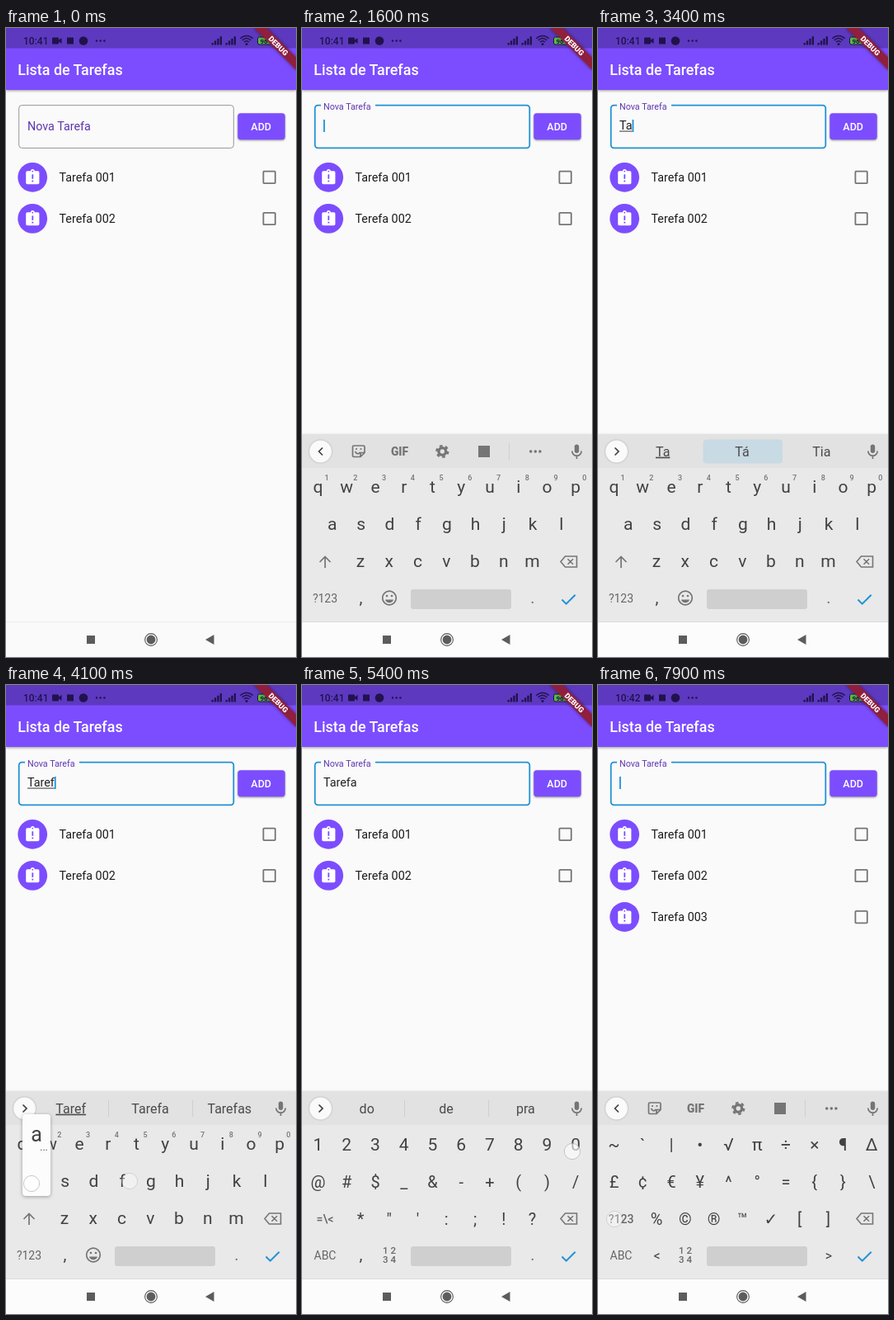
An HTML page that plays this animation: 352 px wide and 762 px high, repeating every 8 s.

```html
<!DOCTYPE html>
<html lang="pt">
<head>
<meta charset="utf-8">
<title>Lista de Tarefas</title>
<style>
html, body { margin: 0; height: 100%; overflow: hidden; background: #fafafa }
svg { display: block; width: 100%; height: 100%; font-family: Roboto, sans-serif }
text { white-space: pre }
</style>
</head>
<body>
<svg id="stage" viewBox="0 0 352 762"></svg>
<script>
const LOOP = 8000, STEP = 100, BODY = 14.34;
const VIOLET = '#7c4dff', BLUE = '#2092d4', GREY = '#757575', INK = '#424242', DARK = '#21124d';

// Timelines: [start, value]
const typed = [[0, ''], [1300, ''], [2900, 'T'], [3300, 'Ta'], [3700, 'Tar'], [3900, 'Tare'],
  [4100, 'Taref'], [4200, 'Tarefa'], [4400, 'Tarefa '], [4460, 'Tarefa '], [5500, 'Tarefa 0'],
  [5700, 'Tarefa 00'], [5900, 'Tarefa 003'], [6900, '']];
const hints = [[0, null], [2900, ['T', 'Te', 'Tá']], [3300, ['Ta', 'Tá', 'Tia']],
  [3700, ['Tar', 'Tarde', 'Tarefa']], [3900, ['Tare', 'Tarefa', 'Tarefas']],
  [4100, ['Taref', 'Tarefa', 'Tarefas']], [4200, ['Tarefa', 'Tarefas', 'Tarifa']],
  [4400, ['do', 'de', 'pra']], [5500, ['0', '00', '000']], [5700, ['00', '000', '0']],
  [5900, ['003', '03', '0003']], [7000, null]];
const layouts = [[0, 'low'], [2500, 'up'], [2900, 'low'], [5100, 'sym'], [7800, 'alt']];
const keys = {
  low: ['qwertyuiop', 'asdfghjkl', 'zxcvbnm'],
  up: ['QWERTYUIOP', 'ASDFGHJKL', 'ZXCVBNM'],
  sym: ['1234567890', '@#$_&-+()/', '*"\':;!?'],
  alt: ['~`|•√π÷×¶∆', '£¢€¥^°={}\\', '%©®™✓[]']
};
// [x, y, start, popup letter]
const taps = [[150, 119, 1100], [158, 560, 2800, 'T'], [34, 604, 3200, 'a'], [123, 560, 3600, 'r'],
  [88, 560, 3800, 'e'], [150, 601, 4000, 'f'], [31, 604, 4100, 'a'], [196.5, 697.5, 4400],
  [24, 714, 4900], [328, 565, 5400], [328, 563, 5600], [88, 557, 5800], [303, 119, 6600], [20, 647, 7800]];

const pen = document.createElement('canvas').getContext('2d');
const clamp = x => Math.min(1, Math.max(0, x));
const last = (list, t) => list.filter(e => e[0] <= t).pop();
const esc = s => s.replace(/&/g, '&amp;').replace(/</g, '&lt;');
const rect = (x, y, w, h, fill, r = 0, more = '') =>
  `<rect x="${x}" y="${y}" width="${w}" height="${h}" rx="${r}" fill="${fill}" ${more}/>`;
const circle = (x, y, r, fill, more = '') => `<circle cx="${x}" cy="${y}" r="${r}" fill="${fill}" ${more}/>`;
const fillPath = (d, fill, more = '') => `<path d="${d}" fill="${fill}" ${more}/>`;
const line = (d, color, w, more = '') =>
  `<path d="${d}" fill="none" stroke="${color}" stroke-width="${w}" ${more}/>`;
const text = (s, x, y, size, fill, more = '') =>
  `<text x="${x}" y="${y}" font-size="${size}" fill="${fill}" ${more}>${esc(s)}</text>`;
const mid = (s, x, y, size, fill, more = '') => text(s, x, y, size, fill, 'text-anchor="middle" ' + more);
const repeat = (n, f) => Array.from({ length: n }, (_, i) => f(i)).join('');
const shadow = (y, blur, color) => `style="filter:drop-shadow(0 ${y}px ${blur}px ${color})"`;

function header(t) {
  const bars = x => repeat(4, i => rect(x + i * 3.4, 18 - i * 2.6, 2.3, 2.5 + i * 2.6, DARK));
  const wifi = repeat(3, i => {
    const r = 4 + i * 3;
    return line(`M${292 - r * .75} ${20 - r * .72}a${r} ${r} 0 0 1 ${r * 1.5} 0`, DARK, 1.5);
  });
  return rect(0, 0, 352, 75, VIOLET, 0, shadow(1.2, 1.8, '#0006')) + rect(0, 0, 352, 24.5, '#5d39bf') +
    text(t < 5800 ? '10:41' : '10:42', 21, 20, 12, DARK, 'font-weight="500"') +
    rect(56, 11.5, 8, 8, DARK, 1) + fillPath('M64 14.5l3.5-2.5v7l-3.5-2.5z', DARK) +
    rect(74, 11.5, 8, 8, DARK) + circle(94, 15.5, 5.3, DARK) +
    repeat(3, i => circle(110 + i * 4.7, 15.5, 1.2, DARK)) +
    bars(249.5) + bars(266.5) + wifi + circle(292, 19.5, 1.5, DARK) +
    rect(305.5, 11, 17, 9, '#59b83d', 2, `stroke="${DARK}"`) + rect(323, 13.5, 2, 4, DARK) +
    mid('96', 313, 18.8, 8, DARK, 'font-weight="700"') +
    text('Lista de Tarefas', 14.3, 56.5, 17.9, '#fff', 'font-weight="500"') +
    `<g transform="translate(330.5 21.5) rotate(45)">` +
    rect(-36, -5.4, 72, 10.8, '#8f1f3c', 0, shadow(0, 2, '#0007')) +
    mid('DEBUG', 0, 3.2, 9.1, '#fff', 'font-weight="900"') + '</g>';
}

function field(t) {
  const focus = t >= 1300, p = 1 - (1 - clamp((t - 1350) / 200)) ** 3;
  const [since, value] = last(typed, t);
  pen.font = BODY + 'px Roboto, sans-serif';
  const w = pen.measureText(value).width;
  const blink = focus && Math.floor((t - since) / 500) % 2 == 0;
  return rect(15.7, 93.6, 260.6, 51.8, 'none', 3.6,
      focus ? `stroke="${BLUE}" stroke-width="1.8"` : 'stroke="#989898" stroke-width="1"') +
    (p ? rect(23, 91.5, 66 * p, 4, '#fafafa') : '') +
    text('Nova Tarefa', 26, 124 - 25.2 * p, BODY * (1 - .25 * p), '#5e35b1') +
    text(value, 26, 123, BODY, '#212121') +
    (t >= 2900 && t < 4400 ? rect(26, 124.6, w, .9, '#212121') : '') +
    (blink ? rect(26 + w, 111, 1.8, 15, BLUE) : '') +
    rect(281.3, 103.2, 57.4, 32, VIOLET, 3.6, shadow(1.2, 1.3, '#0006')) +
    mid('ADD', 309.7, 123.7, 12.5, '#fff', 'font-weight="500"');
}

function task(name, y) {
  return circle(32.2, y, 17.9, VIOLET) +
    rect(24.2, y - 7.6, 16.2, 16, '#fff', 1.8) + circle(32.3, y - 7.4, 2.5, '#fff') +
    circle(32.3, y - 7.2, .9, VIOLET) + rect(31.4, y - 3.5, 1.8, 5.5, VIOLET) + rect(31.4, y + 3.8, 1.8, 1.8, VIOLET) +
    text(name, 64.5, y + 5, BODY, '#1c1c1c') +
    rect(312.4, y - 7.1, 14.4, 14.4, 'none', .8, `stroke="${GREY}" stroke-width="1.8"`);
}

function toolbar() {
  return line('M25 508.5l-4.5 4.5 4.5 4.5', INK, 1.7) +
    line('M63 506h11.5a1.5 1.5 0 0 1 1.5 1.5v7l-5 5h-8a1.5 1.5 0 0 1-1.5-1.5v-10.5a1.5 1.5 0 0 1 1.5-1.5zM76 514.5h-5v5M64.5 513q3 5 6 1', GREY, 1.7) +
    circle(66, 510, 1.1, GREY) + circle(71.5, 510, 1.1, GREY) +
    mid('GIF', 118.5, 517.5, 13.8, GREY, 'font-weight="800"') +
    circle(170.3, 513, 4.4, 'none', `stroke="${GREY}" stroke-width="3.4"`) +
    circle(170.3, 513, 6.9, 'none', `stroke="${GREY}" stroke-width="2.4" stroke-dasharray="3.6 3.62"`) +
    rect(214, 506, 14, 14, GREY) + rect(251, 503, 1, 20, '#cfcfcf') +
    repeat(3, i => circle(277.7 + i * 5.6, 513, 1.8, GREY));
}

function suggestions(words, t) {
  const auto = t >= 3300 && t < 3700, own = t >= 2900 && t < 4400;
  return line('M20.5 508.5l4.5 4.5-4.5 4.5', INK, 1.7) +
    (auto ? rect(127.5, 498.5, 96.5, 29, '#c8dae4', 4) : rect(124, 503, 1, 20, '#cfcfcf') + rect(226, 503, 1, 20, '#cfcfcf')) +
    words.map((s, i) => mid(s, 78.7 + i * 96.3, 518.7, 16, '#4a4a4a',
      own && !i ? 'text-decoration="underline"' : '')).join('');
}

function keyboard(t) {
  const name = last(layouts, t)[1], words = last(hints, t)[1];
  const letters = name == 'low' || name == 'up', low = name == 'low', alt = name == 'alt';
  const rows = keys[name].map((row, r) => [...row].map((c, i) =>
    mid(c, [19.5, letters ? 36.8 : 19.5, 71][r] + i * 34.75, 564.3 + r * 45 - (low ? 1.8 : 0),
      letters || !r ? 21 : 20, INK)).join('')).join('');
  const held = name == 'up' && t < 2700 || t == 7700;
  const side = letters
    ? repeat(10, i => mid(String((i + 1) % 10), 30 + i * 34.75, 548, 9, GREY, 'font-weight="500"')) +
      line('M28 654v-13M21.5 647l6.5-6.5 6.5 6.5', name == 'up' ? BLUE : GREY, 1.7)
    : mid(alt ? '?123' : '=\\<', 28, 651.5, 14, '#666', 'font-weight="500"');
  const emoji = letters
    ? circle(106, 690.5, 8.3, 'none', `stroke="${GREY}" stroke-width="1.7"`) +
      circle(103, 688, 1.3, GREY) + circle(109, 688, 1.3, GREY) + fillPath('M101 692.5h10a5.2 5.2 0 0 1-10 0z', GREY)
    : mid('1 2', 106, 689, 11.5, '#666', 'font-weight="500"') + mid('3 4', 106, 699.5, 11.5, '#666', 'font-weight="500"');
  return rect(0, 493, 352, 270, '#e9e9e9', 0, shadow(-.5, 1, '#0002')) + rect(0, 493, 352, 40, '#e2e2e2') +
    rect(0, 720, 352, 43, '#fcfcfc') +
    circle(22.5, 513, 13.4, '#fafafa', shadow(.7, .9, '#0004')) +
    (words ? suggestions(words, t) : toolbar()) +
    rect(330.8, 504.5, 5.4, 10.5, GREY, 2.7) + line('M327.8 512.5a5.7 5.7 0 0 0 11.4 0M333.5 518v4', GREY, 1.7) +
    (held ? rect(4, 628, 48, 37, '#c4c4c4', 4) : '') + rows + side +
    line('M319.5 640h14v13h-14l-5.5-6.5zM322.5 643.2l6.6 6.6M329.1 643.2l-6.6 6.6', GREY, 1.6) +
    mid(letters ? '?123' : 'ABC', 28, 695.5, 14, '#666') +
    mid(alt ? '<' : ',', 71.5, 697, alt ? 16 : 20, INK) + emoji +
    rect(132, 680, 122, 24, '#cfcfcf', 3) +
    mid(alt ? '>' : '.', 280, 697, alt ? 16 : 20, alt ? INK : GREY) +
    line('M315.5 692.5l5.2 5.2 11-11', BLUE, 2);
}

function popup(c, x, row) {
  return rect(x - 17, row - 82, 34, 99, '#fcfcfc', 4, shadow(1, 2, '#0005')) +
    mid(c, x, row - 49, 25, INK) + mid('...', x + 9, row - 38, 12, INK);
}

function touches(t) {
  return taps.map(([x, y, start, c]) => {
    const age = t - start;
    if (age < 0 || age >= 200) return '';
    const second = c == 'a' || c == 'f';
    const keyX = c == 'a' ? 37 : c == 'f' ? 141 : x;
    return (c && !age ? popup(c, keyX, second ? 602 : 557) : '') +
      circle(x, y, 9.6, '#fff', `fill-opacity=".6" stroke="#aaaabd" stroke-opacity=".65" opacity="${1 - age / 250}"`);
  }).join('');
}

function nav() {
  const c = '#5c5c5c';
  return rect(0, 719, 352, 1, '#0000000d') + rect(98, 736, 10, 10, c) +
    circle(176, 741, 7.4, 'none', `stroke="${c}" stroke-width="1.1"`) + circle(176, 741, 5.4, c) +
    fillPath('M242 741l10.5-6v12z', c);
}

function scene(t) {
  const p = clamp((t - 1330) / 240), rise = p * p * (3 - 2 * p);
  const names = ['Tarefa 001', 'Terefa 002'];
  if (t >= 6900) names.push('Tarefa 003');
  return rect(0, 0, 352, 762, '#fafafa') + header(t) + field(t) +
    names.map((s, i) => task(s, 180.8 + i * 50.1)).join('') +
    (p ? `<g transform="translate(0 ${269 * (1 - rise)})">${keyboard(t)}</g>` : '') +
    nav() + touches(t);
}

const stage = document.getElementById('stage');
let shown = -1;
function tick() {
  const t = Math.floor(performance.now() % LOOP / STEP) * STEP;
  if (t != shown) stage.innerHTML = scene(shown = t);
  requestAnimationFrame(tick);
}
tick();
</script>
</body>
</html>
```
